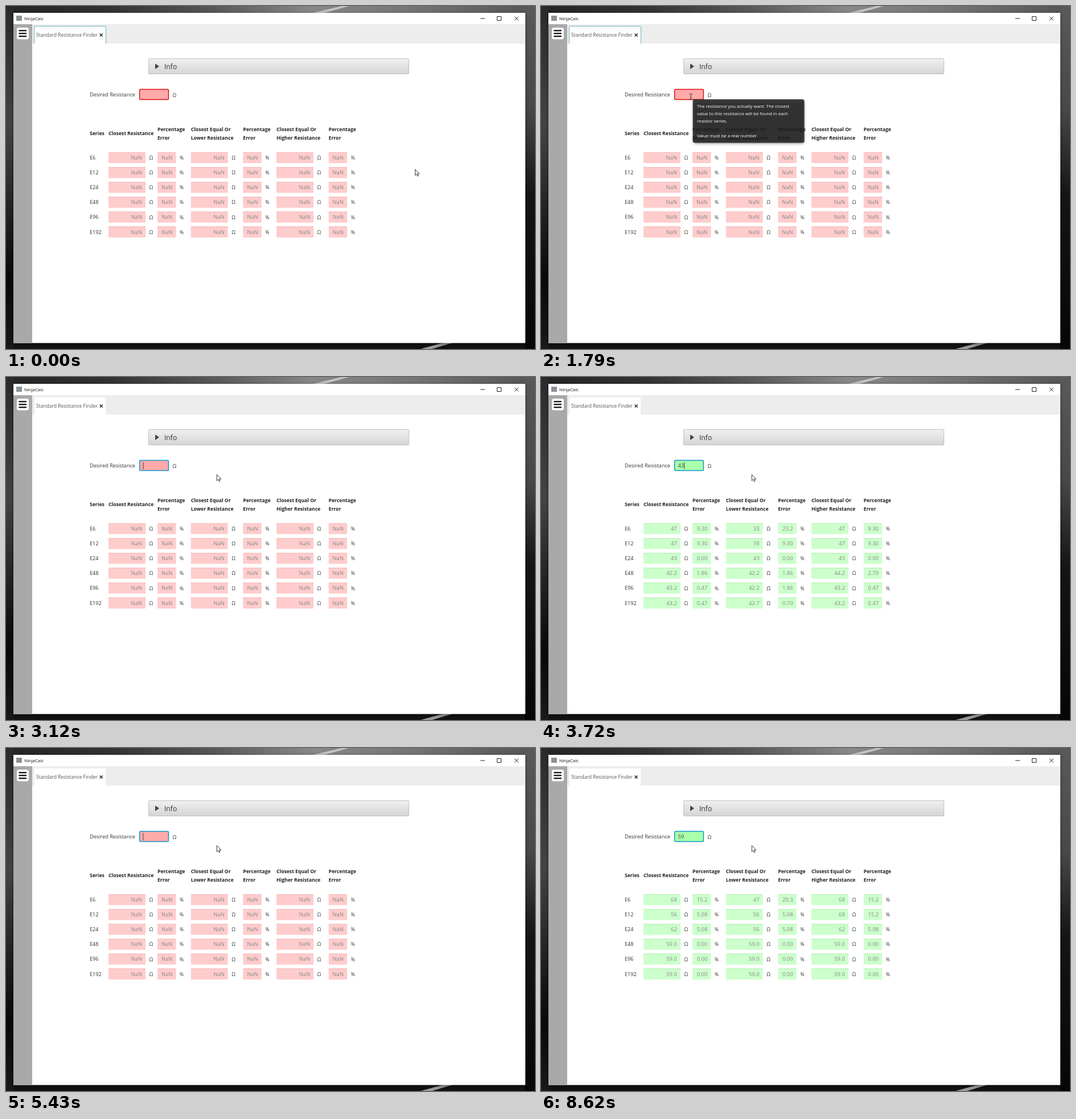
An HTML page that plays this animation: 929x603 px, repeating every 8850 ms.

```html
<!DOCTYPE html>
<html lang="en">
<head>
<meta charset="utf-8">
<title>Standard Resistance Finder</title>
<style>
html, body { margin: 0; width: 100%; height: 100%; overflow: hidden; background: #111; }
svg { display: block; width: 929px; height: 603px; font: 9.1px "Open Sans", "Noto Sans", sans-serif; fill: #333; }
.head { font-size: 8.65px; font-weight: 700; fill: #222; }
.value { font-size: 9.4px; fill: #888; text-anchor: end; }
.unit { font-size: 8.6px; }
.tip { font-size: 7.8px; fill: #fff; }
.line { fill: none; stroke: #222; }
</style>
</head>
<body>
<svg id="stage" viewBox="0 0 929 603">
  <defs>
    <linearGradient id="top">
      <stop offset="0" stop-color="#242424"/><stop offset=".2" stop-color="#333"/>
      <stop offset=".4" stop-color="#5a5a5a"/><stop offset=".58" stop-color="#888"/>
      <stop offset=".75" stop-color="#777"/><stop offset="1" stop-color="#555"/>
    </linearGradient>
    <linearGradient id="left" x2="0" y2="1">
      <stop offset="0" stop-color="#2a2a2a"/><stop offset=".35" stop-color="#444"/>
      <stop offset=".6" stop-color="#222"/><stop offset=".8" stop-color="#080808"/>
      <stop offset="1" stop-color="#1a1a1a"/>
    </linearGradient>
    <linearGradient id="right" x2="0" y2="1">
      <stop offset="0" stop-color="#5a5a5a"/><stop offset=".3" stop-color="#484848"/>
      <stop offset=".55" stop-color="#151515"/><stop offset="1" stop-color="#060606"/>
    </linearGradient>
    <linearGradient id="bar" x2="0" y2="1">
      <stop offset="0" stop-color="#f0f0f0"/><stop offset="1" stop-color="#d5d5d5"/>
    </linearGradient>
    <filter id="blur" x="-10%" y="-10%" width="120%" height="120%"><feGaussianBlur stdDeviation="2.5"/></filter>
  </defs>

  <rect width="929" height="603" fill="#121212"/>
  <rect width="929" height="13" fill="url(#top)"/>
  <rect width="14" height="603" fill="url(#left)"/>
  <rect x="911" width="18" height="603" fill="url(#right)"/>
  <path d="M535 13L590 0H602L556 13Z" fill="#c4c4c4"/>
  <path d="M728 603L768 592H785L748 603Z" fill="#999"/>
  <rect x="13" y="13" width="899" height="581" opacity=".5" fill="#000" filter="url(#blur)"/>

  <rect x="13" y="12" width="899" height="580.5" fill="#fff"/>
  <rect x="18" y="17" width="10" height="9" fill="#8b9297"/>
  <text x="32" y="25" font-size="7.8" fill="#111">NinjaCalc</text>
  <path class="line" d="M833 22H841M862.5 18.5H869.5V25.5H862.5ZM893 18.5L900 25.5M900 18.5L893 25.5"/>
  <rect x="13" y="32" width="33" height="560.5" fill="#a9a9a9"/>
  <rect x="19" y="38" width="21" height="20.5" rx="3.5" fill="#fff"/>
  <path class="line" d="M23.5 43.2H35M23.5 48.2H35M23.5 53.2H35" stroke-width="2.6" stroke-linecap="round"/>
  <rect x="46" y="32" width="866" height="34" fill="#ededed"/>
  <path d="M50 66V37Q50 36 51 36H174Q175 36 175 37V66Z" fill="#fff"/>
  <path id="tabFocus" d="M49.5 66V36.5Q49.5 35.5 50.5 35.5H174.5Q175.5 35.5 175.5 36.5V66" fill="none" stroke="#69b3bd"/>
  <text x="53" y="54" font-size="8.51" fill="#555">Standard Resistance Finder</text>
  <path class="line" d="M164.7 48.5L169.7 53.5M169.7 48.5L164.7 53.5" stroke-width="1.4"/>

  <rect x="250.5" y="92.5" width="457" height="27" rx="1.5" fill="url(#bar)" stroke="#c2c2c2"/>
  <path d="M262 101.2V111L269 106.1Z" fill="#444"/>
  <text x="278" y="110.5" font-size="12.1">Info</text>

  <text x="147" y="159">Desired Resistance</text>
  <rect id="field" x="234.6" y="146.6" width="50.8" height="18" rx="2" stroke-width="1.5"/>
  <text id="typed" x="240.5" y="159" font-size="9.4" fill="#444"></text>
  <rect id="caret" y="149.5" width="1" height="12.5" fill="#444"/>
  <text x="292.5" y="159.5" class="unit">Ω</text>

  <g id="table"></g>

  <g id="tooltip">
    <rect x="268" y="167" width="194" height="75" rx="4" opacity=".4" fill="#000" filter="url(#blur)"/>
    <rect x="266.5" y="164" width="196" height="76.5" rx="3.5" fill="#1e1e1e" fill-opacity=".84"/>
    <text class="tip" x="274" y="179">The resistance you actually want. The closest</text>
    <text class="tip" x="274" y="192">value to this resistance will be found in each</text>
    <text class="tip" x="274" y="205">resistor series.</text>
    <text class="tip" x="274" y="231">Value must be a real number.</text>
  </g>
  <path id="beam" class="line" d="M260.5 154.5H262.2L263.2 155.5L264.2 154.5H266M263.2 155.5V163.5M260.5 164.5H262.2L263.2 163.5L264.2 164.5H266"/>
  <path id="arrow" d="M.5 .5V11.3L3 9L4.7 12.7L6.3 12L4.7 8.4H8Z" fill="#fff" stroke="#222" stroke-width=".9"/>
</svg>
<script>
const LOOP = 8850;
const $ = id => document.getElementById(id);
const show = (el, on) => el.setAttribute('visibility', on ? 'visible' : 'hidden');

function add(tag, attrs, text = '') {
  const el = document.createElementNS('http://www.w3.org/2000/svg', tag);
  for (const key in attrs) el.setAttribute(key, attrs[key]);
  el.textContent = text;
  return $('table').appendChild(el);
}

// Preferred resistor values for one decade.
const E24 = [10, 11, 12, 13, 15, 16, 18, 20, 22, 24, 27, 30, 33, 36, 39, 43, 47, 51, 56, 62, 68, 75, 82, 91];
function decade(n) {
  if (n <= 24) return E24.filter((_, i) => i % (24 / n) === 0).map(v => v / 10);
  return Array.from({ length: n }, (_, i) => {
    const v = Math.round(100 * 10 ** (i / n));
    return (v === 919 ? 920 : v) / 100;
  });
}

function solve(n, want) {
  const all = [1, 10, 100].flatMap(m => decade(n).map(v => +(v * m).toFixed(4)));
  const low = all.filter(v => v <= want).pop();
  const high = all.find(v => v >= want);
  const near = high - want <= want - low + 1e-9 ? high : low;
  return [near, low, high].flatMap(v => [
    v.toPrecision(n > 24 ? 3 : 2),
    (Math.abs(v - want) / want * 100).toFixed(2).slice(0, 4)
  ]);
}

const series = [6, 12, 24, 48, 96, 192];
const columns = [[180, 65], [266, 32.5], [324.7, 65], [416.3, 32.5], [475, 65], [566.6, 32.5]];
const heads = ['Closest Resistance', 'Percentage|Error', 'Closest Equal Or|Lower Resistance',
  'Percentage|Error', 'Closest Equal Or|Higher Resistance', 'Percentage|Error'];

add('text', { x: 147, y: 227.3, class: 'head' }, 'Series');
heads.forEach((label, c) => {
  const lines = label.split('|');
  lines.forEach((line, i) =>
    add('text', { x: columns[c][0], y: lines.length > 1 ? 220.2 + 14.4 * i : 227.3, class: 'head' }, line));
});

const cells = series.map((n, r) => {
  const y = 266.5 + 26.13 * r;
  add('text', { x: 147, y: y + 3.4 }, 'E' + n);
  return columns.map(([x, w], c) => {
    const box = add('rect', { x, y: y - 9.6, width: w, height: 19.4, rx: 1 });
    const edge = add('rect', { x, y: y - 9.6, width: w, height: 1.2 });
    const text = add('text', { x: x + w - 6.2, y: y + 3.4, class: 'value' });
    add('text', { x: x + w + 6.6, y: y + 3.5, class: 'unit' }, c % 2 ? '%' : 'Ω');
    return { box, edge, text };
  });
});

// [time, value] steps; each holds until the next.
const typing = [[0, ''], [3260, '4'], [3720, '43'], [5110, '4'], [5430, ''], [6530, '5'], [7060, '59']];
const blink = [[0, 0], [2187, 1], [2650, 0], [3120, 1], [4270, 0], [4730, 1], [5890, 0], [6360, 1],
  [7610, 0], [8070, 1], [8620, 0]];
const at = (steps, t) => steps.filter(s => s[0] <= t).pop()[1];

let current = null;
function setValue(value) {
  if (value === current) return;
  current = value;
  $('typed').textContent = value;
  $('caret').setAttribute('x', 240.4 + 5.4 * value.length);
  $('field').setAttribute('fill', value ? '#afa' : '#faa');
  cells.forEach((row, r) => {
    const results = value ? solve(series[r], +value) : [];
    row.forEach(({ box, edge, text }, c) => {
      box.setAttribute('fill', value ? '#cfc' : '#fcc');
      edge.setAttribute('fill', value ? '#bfefbf' : '#f3bfbf');
      text.textContent = value ? results[c] : 'NaN';
    });
  });
}

const ease = p => p * p * (3 - 2 * p);
function glide(t, start, count, from, to) {
  const step = Math.max(0, Math.min(count, Math.floor((t - start) / 77) + 1));
  const p = ease(step / count);
  return from.map((v, i) => v + (to[i] - v) * p);
}

function pointer(t) {
  if (t < 1240) return glide(t, 320, 12, [718, 286.5], [260, 156]);
  if (t < 2110) return [260, 160];
  if (t < 2570) return glide(t, 2109, 4, [260, 158], [369.5, 170]);
  return [369.7, 171];
}

function draw(t) {
  const focused = t >= 1940;
  const beam = t >= 1790 && t < 2110;
  setValue(at(typing, t));
  show($('caret'), at(blink, t));
  show($('tabFocus'), !focused);
  $('field').setAttribute('stroke', focused ? '#0c96cc' : '#e01010');
  show($('tooltip'), t >= 1240 && t < 1940);
  show($('beam'), beam);
  show($('arrow'), !beam);
  $('arrow').setAttribute('transform', `translate(${pointer(t)})`);
}

const begin = performance.now();
function tick() {
  draw((performance.now() - begin) % LOOP);
  requestAnimationFrame(tick);
}
tick();
</script>
</body>
</html>
```
